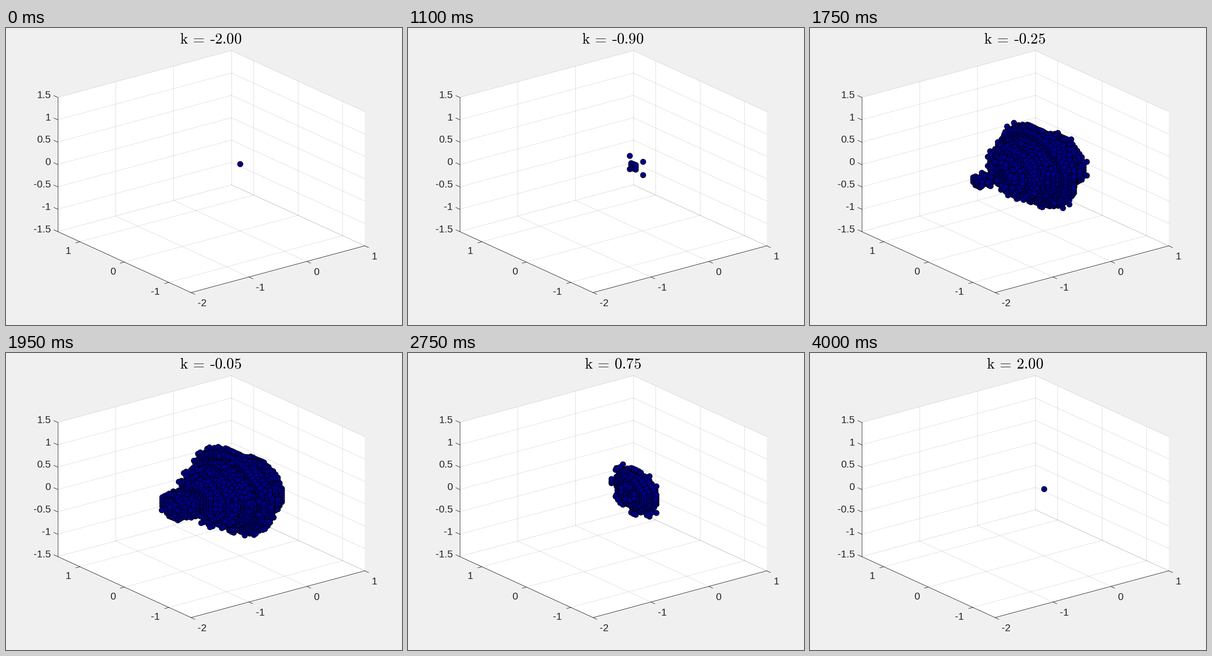
A matplotlib script that plays this animation: 864x648 px, repeating every 4050 ms.

```python
import numpy as np
import matplotlib.pyplot as plt
from matplotlib.animation import FuncAnimation
from matplotlib.markers import MarkerStyle
from matplotlib.transforms import Affine2D

W, H = 864, 648
FRAMES, STEP_MS = 81, 50
GRID = 20                      # samples per unit
CAP = 50                       # iteration limit
INK = "#262626"
DOT = 12                       # marker diameter in px
EM = 33                        # title size in px

plt.rcParams["font.family"] = "Liberation Sans"
plt.rcParams["mathtext.fontset"] = "cm"


def project(x, y, z):
    """Axis coordinates to stage pixels."""
    return (510.9 + 126.33 * x - 97 * y,
            296.3 - 34 * x - 44.35 * y - 97.6 * z)


def lifetimes():
    """Iterations survived by c = x + i*sqrt(m)/GRID, indexed [x + 40, m]."""
    x = np.arange(-40, 21)[:, None] / GRID
    m = np.arange(3401)[None, :]
    c = x + 1j * np.sqrt(m) / GRID
    z = np.zeros_like(c)
    alive = np.ones(c.shape, bool)
    life = np.zeros(c.shape, int)
    for _ in range(CAP):
        z = np.where(alive, z * z + c, z)
        alive &= np.abs(z) <= 2
        life += alive
    return life


life = lifetimes()
# keep the outermost filaments that should stay visible
depth = min(life[x + 40, m] for x, m in ((-3, 326), (-2, 342), (7, 164)))
inside = life >= depth

# quaternion lattice, sorted from far to near
side = np.arange(-30, 31)
gx, gy, gz = (a.ravel() for a in
              np.meshgrid(np.arange(-40, 21), side, side, indexing="ij"))
order = np.argsort(-0.527 * gx - 0.687 * gy + 0.5 * gz, kind="stable")
gx, gy, gz = gx[order], gy[order], gz[order]
radius2 = gy ** 2 + gz ** 2
px, py = project(gx / GRID, gy / GRID, gz / GRID)
px, py = np.round(px - 0.9), np.round(py - 0.7)
origin = (gx == 0) & (radius2 == 0)

fig = plt.figure(figsize=(W / 72, H / 72), dpi=72, facecolor="#f0f0f0")
ax = fig.add_axes([0, 0, 1, 1])
ax.set_xlim(0, W)
ax.set_ylim(H, 0)
ax.axis("off")


def segment(a, b, **style):
    (x0, y0), (x1, y1) = project(*a), project(*b)
    ax.plot([x0, x1], [y0, y1], lw=1, color=INK, **style)


def tick(p, dx, dy):
    x, y = project(*p)
    ax.plot([x, x + dx], [y, y + dy], lw=1, color=INK)


def label(p, value, dx, dy, ha):
    x, y = project(*p)
    ax.text(x + dx, y + dy, f"{value:g}", size=22, color=INK,
            ha=ha, va="baseline")


LO, HI = -1.5, 1.5
heights = np.arange(LO, HI + 0.1, 0.5)

# panes
for pane in (
    [(-2, LO, LO), (1, LO, LO), (1, HI, LO), (-2, HI, LO)],
    [(-2, HI, LO), (1, HI, LO), (1, HI, HI), (-2, HI, HI)],
    [(1, LO, LO), (1, HI, LO), (1, HI, HI), (1, LO, HI)],
):
    ax.fill(*zip(*(project(*p) for p in pane)), color="white", lw=0)

# grid
faint = dict(alpha=0.15)
for x in (-1, 0, 1):
    segment((x, LO, LO), (x, HI, LO), **faint)
    segment((x, HI, LO), (x, HI, HI), **faint)
for y in (-1, 0, 1):
    segment((-2, y, LO), (1, y, LO), **faint)
    segment((1, y, LO), (1, y, HI), **faint)
for z in heights:
    segment((-2, HI, z), (1, HI, z), **faint)
    segment((1, HI, z), (1, LO, z), **faint)

# axes, ticks and numbers
segment((-2, LO, LO), (1, LO, LO))
segment((-2, LO, LO), (-2, HI, LO))
segment((-2, HI, LO), (-2, HI, HI))
for x in (-2, -1, 0, 1):
    tick((x, LO, LO), 8.3, 3.8)
    label((x, LO, LO), x, 14.6, 29.8, "left")
for y in (-1, 0, 1):
    tick((-2, y, LO), -8.9, 2.4)
    label((-2, y, LO), y, -19.2, 26.9, "right")
for z in heights:
    tick((-2, HI, z), -8.3, -3.8)
    label((-2, HI, z), z, -15.2, 1.5, "right")

# dots centred on whole pixels
shift = Affine2D().translate(0.5 / DOT, -0.5 / DOT)
dots, = ax.plot([], [], ls="none", marker=MarkerStyle("o", transform=shift),
                ms=DOT, mfc=(0, 0, 0.516), mec="black", mew=1)

# title pieces
BASE = 34
PAD = 1                        # margin of rendered math text


def piece(ha):
    return ax.text(0, BASE, "", size=EM, color="black", ha=ha, va="baseline")


name, equals, number = piece("left"), piece("center"), piece("left")
name.set_text(r"$\mathrm{k}$")
equals.set_text("$=$")
hyphen, = ax.fill([0, 1, 1, 0], [0, 0, 1, 1], color="black", lw=0)


def set_title(step):
    negative = step < 0
    x = 447.7 - (4.083 if negative else 3.75) * EM / 2
    name.set_x(x - PAD)
    equals.set_x(x + 1.14 * EM)
    x += 1.972 * EM
    hyphen.set_visible(negative)
    if negative:
        left, right = x + 0.011 * EM, x + 0.276 * EM
        top, bottom = BASE - 0.245 * EM, BASE - 0.187 * EM
        hyphen.set_xy([(left, top), (right, top),
                       (right, bottom), (left, bottom)])
        x += 0.333 * EM
    number.set_x(x - PAD)
    number.set_text(rf"$\mathrm{{{abs(step) / GRID:.2f}}}$")


def update(frame):
    step = frame - 40
    shown = inside[gx + 40, radius2 + step * step]
    if not shown.any():
        shown = origin
    dots.set_data(px[shown], py[shown])
    set_title(step)
    return dots, name, equals, number, hyphen


anim = FuncAnimation(fig, update, frames=FRAMES, interval=STEP_MS,
                     repeat=True, repeat_delay=0, blit=False)
plt.show()
```
